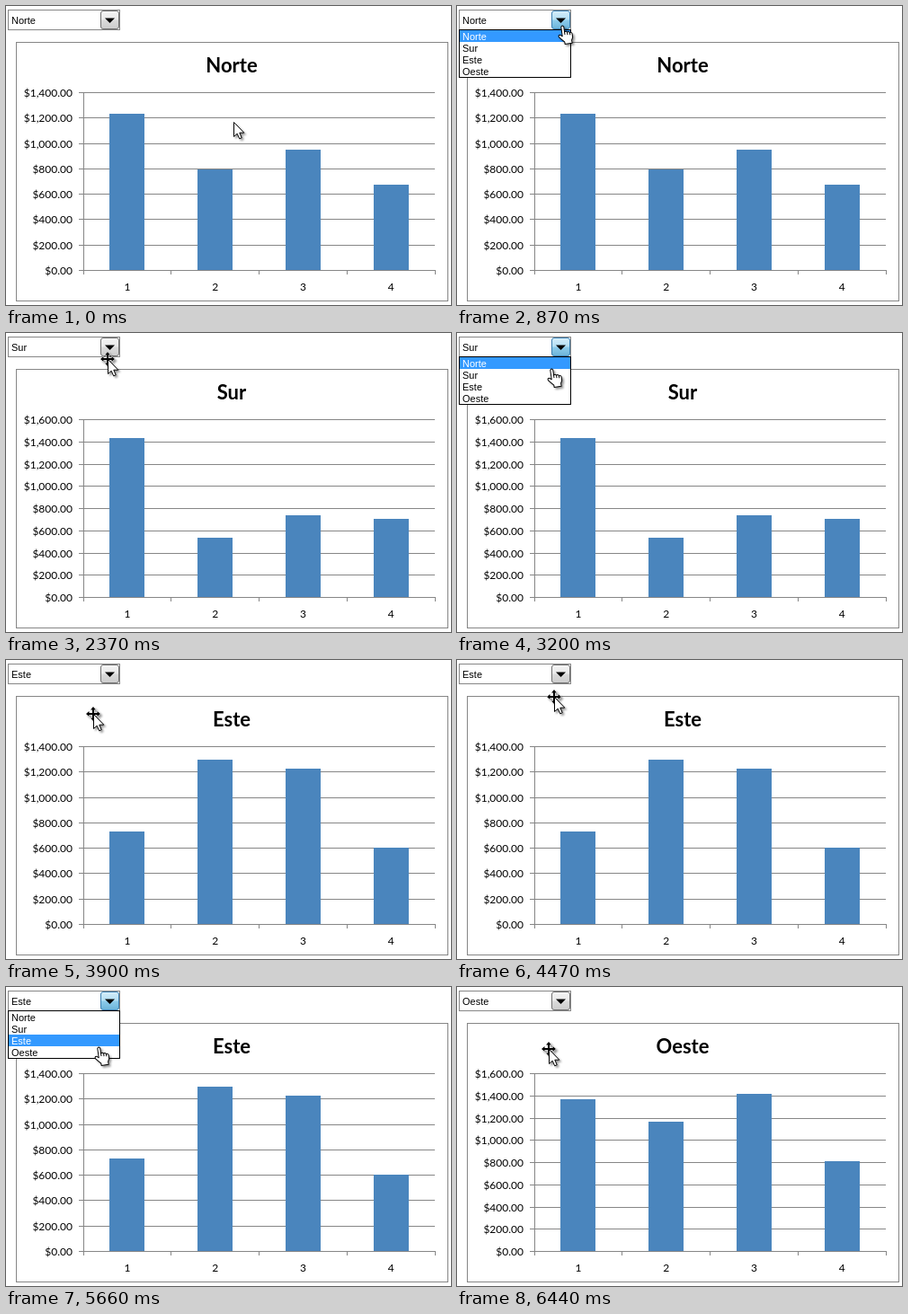
These frames come from a looping animation (495x333 px, 6970 ms). An HTML page:

```html
<!DOCTYPE html>
<html lang="es">
<head>
<meta charset="utf-8">
<style>
html, body { margin: 0; width: 100%; height: 100%; overflow: hidden; background: #fff; }
svg { display: block; width: 495px; height: 333px; }
.crisp { shape-rendering: crispEdges; }
.line { stroke: #868686; fill: none; }
.chart { font-family: Lato, sans-serif; font-size: 12px; }
.title { font-size: 22px; font-weight: 700; }
.ui { font-family: "Liberation Sans", Arial, sans-serif; font-size: 11px; }
.cursor { filter: drop-shadow(2px 2px 1px rgba(0, 0, 0, .4)); }
.cursor path { stroke-linejoin: round; }
</style>
</head>
<body>
<svg viewBox="0 0 495 333">
  <defs>
    <linearGradient id="gray" x2="0" y2="1">
      <stop offset="0" stop-color="#f4f4f4"/><stop offset=".48" stop-color="#e9e9e9"/>
      <stop offset=".52" stop-color="#dadada"/><stop offset="1" stop-color="#cccccc"/>
    </linearGradient>
    <linearGradient id="blue" x2="0" y2="1">
      <stop offset="0" stop-color="#d6eefa"/><stop offset=".48" stop-color="#b2def3"/>
      <stop offset=".52" stop-color="#8ccbea"/><stop offset="1" stop-color="#6db5da"/>
    </linearGradient>
  </defs>
  <rect width="495" height="333" fill="#fff"/>
  <rect class="line crisp" x="11.5" y="40.5" width="480" height="288"/>
  <g id="chart" class="chart"></g>
  <g class="ui">
    <rect class="line crisp" x="2.5" y="4.5" width="124" height="22"/>
    <text id="value" x="6" y="20"></text>
    <rect id="button" x="105.5" y="5.5" width="20" height="20" rx="2.5"/>
    <path d="M110 13.5H121L115.5 19Z"/>
    <g id="list">
      <rect class="crisp" x="2.5" y="26.5" width="124" height="53" fill="#fff" stroke="#000"/>
      <rect id="mark" class="crisp" x="3" width="123" height="13" fill="#3399ff"/>
    </g>
  </g>
  <g id="cursor" class="cursor">
    <g id="hand" transform="translate(-6 1) rotate(-8 8 11)" fill="#fff" stroke="#000">
      <path d="M5 2Q6.5-.7 8 2V8Q9.7 6.5 11 8.5Q12.7 7.3 13.7 9.4Q15.7 8.5 16.2 11V15L14.7 18V21.3H6.7V19L1.2 13Q.2 10.3 2.8 10.4L5 12.4Z"/>
      <path d="M8 8V11M11 8.5V11.5M13.7 9.5V12" fill="none"/>
    </g>
    <g id="cross" stroke-width="1">
      <path id="arms" fill="#000" stroke="#fff" paint-order="stroke"/>
    </g>
    <path id="arrow" d="M.5 .5V16.5L4.2 13.2 6.7 18.8 9.2 17.7 6.8 12.2H11.8Z" fill="#fff" stroke="#000"/>
  </g>
</svg>
<script>
const LOOP = 6970, STEP = 60;
const $ = id => document.getElementById(id);
const NS = 'http://www.w3.org/2000/svg';

function add(parent, tag, attrs, text) {
  const el = document.createElementNS(NS, tag);
  for (const k in attrs) el.setAttribute(k, attrs[k]);
  if (text !== undefined) el.textContent = text;
  parent.appendChild(el);
  return el;
}

// Each region: axis intervals of $200 and the top edge of its four bars
const regions = [
  { name: 'Norte', rows: 7, tops: [120, 182, 160, 199] },
  { name: 'Sur', rows: 8, tops: [117, 228, 203, 207] },
  { name: 'Este', rows: 7, tops: [191, 111, 121, 209] },
  { name: 'Oeste', rows: 8, tops: [125, 150, 119, 194] }
];
const LEFT = 86, RIGHT = 477, TOP = 96, BASE = 294;
const slot = (RIGHT - LEFT) / 4;

function buildChart({ name, rows, tops }) {
  const g = add($('chart'), 'g', {});
  add(g, 'text', { x: 251, y: 74, 'text-anchor': 'middle', class: 'title' }, name);
  let d = `M${LEFT + .5} ${TOP}V${BASE + 5}`;
  for (let i = 0; i <= rows; i++) {
    const y = Math.round(BASE - (BASE - TOP) * i / rows);
    d += `M${LEFT - 5} ${y + .5}H${RIGHT}`;
    const money = '$' + (i * 200).toLocaleString('en-US', { minimumFractionDigits: 2 });
    add(g, 'text', { x: 74, y: y + 5, 'text-anchor': 'end' }, money);
  }
  for (let i = 1; i <= 4; i++) d += `M${Math.floor(LEFT + slot * i) + .5} ${BASE}v5`;
  add(g, 'path', { d, class: 'line crisp' });
  tops.forEach((y, i) => {
    const mid = LEFT + slot * (i + .5);
    add(g, 'rect', { x: Math.round(mid - 19.6), y, width: 39, height: BASE - y, fill: '#4a85bd', class: 'crisp' });
    add(g, 'text', { x: mid, y: 317, 'text-anchor': 'middle' }, i + 1);
  });
  return g;
}

const charts = regions.map(buildChart);
const items = regions.map((r, i) => add($('list'), 'text', { x: 6, y: 38 + 13 * i }, r.name));
$('arms').setAttribute('d',
  'M0-8L3-4.5H1V-1H4.5V-3L8 0 4.5 3V1H1V4.5H3L0 8-3 4.5H-1V1H-4.5V3L-8 0-4.5-3V-1H-1V-4.5H-3Z');

// Cursor moves: start, end, from x, y, to x, y
const moves = [
  [60, 740, 253, 129, 118, 20],
  [1200, 1560, 118, 20, 94, 50],
  [1950, 2560, 94, 50, 117, 24],
  [2620, 2750, 117, 24, 118, 22],
  [3140, 3200, 118, 22, 106, 38],
  [3260, 3640, 106, 38, 97, 62],
  [3900, 3900, 97, 62, 97, 60],
  [4230, 4770, 97, 60, 119, 21],
  [5300, 5780, 119, 21, 102, 71],
  [6440, 6440, 102, 71, 102, 69]
];
// Open times of the list and the item selected before it opens
const opens = [[870, 1890, 0], [2880, 3900, 1], [4970, 6440, 2]];

function pointer(t) {
  let x = 253, y = 129;
  for (const [a, b, x0, y0, x1, y1] of moves) {
    if (t < a) break;
    const done = STEP * (Math.floor((t - a) / STEP) + 1);
    const p = t >= b ? 1 : Math.min(1, done / (b - a + STEP));
    const e = p * p * (3 - 2 * p);
    x = Math.round(x0 + (x1 - x0) * e);
    y = Math.round(y0 + (y1 - y0) * e);
  }
  return [x, y];
}

const show = (el, on) => el.setAttribute('visibility', on ? 'inherit' : 'hidden');
const count = (times, t) => times.filter(s => t >= s).length;

function render(t) {
  const [x, y] = pointer(t);
  const open = opens.find(([a, b]) => t >= a && t < b);
  const chosen = count([1890, 3900, 6440], t);
  const plotted = count([1950, 3900, 6440], t);

  charts.forEach((g, i) => show(g, i === plotted));
  $('value').textContent = regions[chosen].name;
  $('button').setAttribute('fill', open ? 'url(#blue)' : 'url(#gray)');
  $('button').setAttribute('stroke', open ? '#3c7fb1' : '#707070');

  show($('list'), !!open);
  if (open) {
    const row = y < 27 ? open[2] : Math.min(3, Math.floor((y - 27) / 13));
    $('mark').setAttribute('y', 27 + 13 * row);
    items.forEach((el, i) => el.setAttribute('fill', i === row ? '#fff' : '#000'));
  }

  const hand = !!open || y < 28 || (t >= 1890 && t < 1950);
  show($('hand'), hand);
  show($('arrow'), !hand);
  show($('cross'), !hand && y < TOP);
  $('cursor').setAttribute('transform', `translate(${x} ${y})`);
}

const start = performance.now();
function tick() {
  render((performance.now() - start) % LOOP);
  requestAnimationFrame(tick);
}
render(0);
requestAnimationFrame(tick);
</script>
</body>
</html>
```
